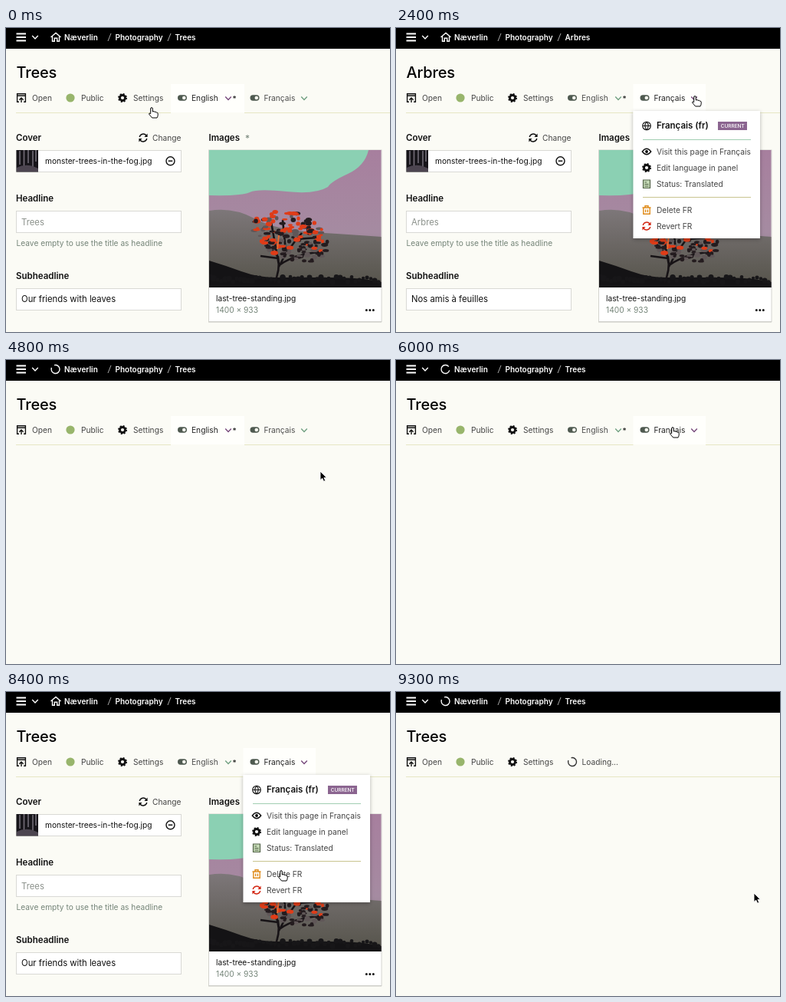
Animation of 501x396 px, one loop 9600 ms. Source, as an HTML page:

```html
<!DOCTYPE html>
<html lang="en">
<head>
<meta charset="utf-8">
<title>Language menu</title>
<style>
html, body { margin: 0; width: 100%; height: 100%; overflow: hidden; background: #fbfbf5; }
svg { display: block; width: 501px; height: 396px; font: 10.2px Inter, "Open Sans", sans-serif; }
text { fill: #444; white-space: pre; }
.crumb { font-size: 10px; font-weight: 600; fill: #fff; }
.title { font-size: 20px; font-weight: 500; fill: #000; letter-spacing: -.2px; }
.label { font-size: 11.5px; font-weight: 600; fill: #111; }
.value { font-size: 11.3px; fill: #111; }
.hint { fill: #748478; }
.ink { fill: #111; }
.red { fill: #d32814; }
.box { fill: #fff; stroke: #d9d9d5; }
.line { fill: none; stroke: currentColor; stroke-width: 1.4; }
</style>
</head>
<body>
<svg viewBox="0 0 501 396">
  <defs>
    <linearGradient id="dusk" x2="0" y2="1">
      <stop offset="0" stop-color="#a77f9e"/><stop offset=".6" stop-color="#a58ba1"/><stop offset="1" stop-color="#776f76"/>
    </linearGradient>
    <linearGradient id="hill" x2="0" y2="1">
      <stop offset="0" stop-color="#7d7779"/><stop offset="1" stop-color="#55534a"/>
    </linearGradient>
    <filter id="shade" x="-10%" y="-10%" width="120%" height="125%">
      <feDropShadow dx="0" dy="1.5" stdDeviation="2.5" flood-opacity=".3"/>
    </filter>
    <clipPath id="photo"><path d="M265 159H489.5V338H265z"/></clipPath>
    <path id="chev" class="line" d="M-3.8 -2L0 2L3.8 -2"/>
    <g id="gear">
      <circle r="3.5" fill="none" stroke="currentColor" stroke-width="2.8"/>
      <circle r="5" fill="none" stroke="currentColor" stroke-width="2" stroke-dasharray="2 1.927"/>
    </g>
    <g id="turn">
      <path class="line" d="M-4.8 -1A5 5 0 0 1 4 -3M4.8 1A5 5 0 0 1 -4 3"/>
      <path fill="currentColor" d="M5.6 -5.5V-1H1.4zM-5.6 5.5V1H-1.4z"/>
    </g>
    <g id="bin">
      <path class="line" stroke-width="1.2" d="M-5.5 -3H5.5M-2 -3V-5.2H2V-3M-4.2 -3V5.2H4.2V-3M-1.4 -.5V3M1.4 -.5V3"/>
    </g>
    <g id="toggle">
      <rect x="-6" y="-3.7" width="12" height="7.4" rx="3.7" fill="#4f5a50"/>
      <circle cx="2.3" r="2.3" fill="#f6f6ee"/>
    </g>
    <path id="ring" class="line" stroke-width="1.8" d="M-1.4 -5.3A5.5 5.5 0 1 1 -5.1 -2"/>
  </defs>

  <rect width="501" height="396" fill="#fbfbf5"/>
  <rect width="501" height="27"/>
  <path d="M13.5 7.5H26M13.5 12H26M13.5 16.5H26" stroke="#fff" stroke-width="1.8"/>
  <g color="#fff">
    <use href="#chev" x="38" y="12"/>
    <path id="home" class="line" d="M58.5 12L65 6.5L71.5 12M60.5 11V17.3H63.3V13.2H66.7V17.3H69.5V11"/>
    <use id="spin" href="#ring"/>
  </g>
  <text class="crumb" x="76" y="16">Næverlin</text>
  <text class="crumb" x="142.5" y="16">Photography</text>
  <text class="crumb" x="220.5" y="16" data-en="Trees" data-fr="Arbres"></text>
  <path d="M133 17L137 7M211 17L215 7" stroke="#aaa"/>

  <text class="title" x="13.5" y="64.5" data-en="Trees" data-fr="Arbres"></text>
  <rect id="tab" y="73" height="37" fill="#fffffc"/>
  <path id="rule" stroke="#e6e6c4"/>
  <path class="line" color="#111" d="M17 96.3H14.6V85.8H25.4V96.3H23M14.6 88.3H25.4M20 97V91.5M17.3 93.8L20 91.1L22.7 93.8"/>
  <text x="34" y="95">Open</text>
  <circle cx="84" cy="91" r="5.6" fill="#98b56c"/>
  <text x="98" y="95">Public</text>
  <use href="#gear" x="152" y="91" color="#111"/>
  <text x="166" y="95">Settings</text>
  <g id="langs">
    <use href="#toggle" x="230" y="91"/>
    <text id="enText" x="242" y="95">English</text>
    <use id="enChev" href="#chev" x="290" y="91.5"/>
    <text class="ink" x="295.5" y="95.5">*</text>
    <use href="#toggle" x="324.5" y="91"/>
    <text id="frText" x="336.5" y="95">Français</text>
    <use id="frChev" href="#chev" x="389" y="91.5"/>
  </g>
  <g id="wait">
    <use id="spinTab" href="#ring" color="#333"/>
    <text x="242.5" y="95">Loading...</text>
  </g>

  <g id="content">
    <text class="label" x="13" y="147">Cover</text>
    <use href="#turn" x="179" y="143" color="#111"/>
    <text x="191" y="146.5">Change</text>
    <rect class="box" x="13.5" y="159.5" width="215" height="28"/>
    <rect x="13.5" y="159" width="28.5" height="28.5" fill="#17151a"/>
    <path d="M18 160V178M23.5 159V182M29 159V176M35 160V181M39 159V174" stroke="#77717c" stroke-width="1.5"/>
    <path d="M14 182Q27 175 42 183V187H14z" fill="#4c4550"/>
    <text class="ink" x="51" y="177">monster-trees-in-the-fog.jpg</text>
    <path class="line" color="#111" d="M209 173.3a5.5 5.5 0 1 1 11 0a5.5 5.5 0 1 1 -11 0M211.7 173.3H217.3"/>

    <text class="label" x="13" y="226">Headline</text>
    <rect class="box" x="13.5" y="238.5" width="215" height="28"/>
    <text class="value" style="fill:#8b918b" x="20" y="257" data-en="Trees" data-fr="Arbres"></text>
    <text class="hint" x="13.5" y="283.5">Leave empty to use the title as headline</text>
    <text class="label" x="13" y="327">Subheadline</text>
    <rect class="box" x="13.5" y="339.5" width="215" height="28"/>
    <text class="value" x="20" y="357" data-en="Our friends with leaves" data-fr="Nos amis à feuilles"></text>

    <text class="label" x="264.5" y="147">Images</text>
    <text class="hint" x="312" y="148" font-size="12">*</text>
    <rect x="264.5" y="159" width="225.5" height="223.5" fill="#fff" stroke="#d4d4cf"/>
    <path d="M264 383H490" stroke="#c9c9c4"/>
    <g id="scene" clip-path="url(#photo)">
      <path d="M265 159H490V338H265z" fill="url(#dusk)"/>
      <path d="M265 159H473Q468 180 446 190T420 207Q404 217 366 213T318 214T265 218z" fill="#8bd0b3"/>
      <path d="M265 238Q296 233 324 248T400 266T490 272V338H265z" fill="url(#hill)"/>
      <path d="M265 303Q285 309 307 317T352 325T420 325T490 331V338H265z" fill="#141315"/>
    </g>
    <text class="ink" x="274" y="356">last-tree-standing.jpg</text>
    <text class="hint" x="274" y="371">1400 × 933</text>
    <path d="M470.3 367.5h.01M474.8 367.5h.01M479.3 367.5h.01" stroke="#111" stroke-width="3" stroke-linecap="round"/>
  </g>

  <g id="menu">
    <rect x="309.5" y="108" width="165.5" height="166" fill="#fff" filter="url(#shade)"/>
    <path class="line" color="#111" d="M321.7 127.5a5.3 5.3 0 1 1 10.6 0a5.3 5.3 0 1 1 -10.6 0H332.3M327 122.2Q322.5 127.5 327 132.8Q331.5 127.5 327 122.2" style="stroke-width:1.1"/>
    <text class="label" x="340" y="131.3">Français (fr)</text>
    <rect x="420" y="122" width="38" height="11" fill="#8b6590"/>
    <text x="423.7" y="130" style="font-size:6.5px;font-weight:500;fill:#fff">CURRENT</text>
    <path d="M322 145.5H463" stroke="#a2ceb2"/>
    <path d="M322 220.5H463" stroke="#c9c58f"/>
    <path class="line" color="#111" d="M321.3 161Q327 153.5 332.7 161Q327 168.5 321.3 161z"/>
    <circle cx="327" cy="161" r="1.9"/>
    <text x="340" y="165">Visit this page in Français</text>
    <use href="#gear" x="327" y="182" color="#111"/>
    <text x="340" y="186">Edit language in panel</text>
    <path d="M322.5 198H331.5V208.5H322.5z" fill="#c4d9b5" stroke="#536348" stroke-width="1.2"/>
    <path d="M324.5 201H327M324.5 203.5H329.5M324.5 206H329.5" stroke="#536348"/>
    <text x="340" y="207">Status: Translated</text>
    <use href="#bin" x="327" y="237" color="#df8a18"/>
    <text x="340" y="241">Delete FR</text>
    <use href="#turn" x="327" y="258" color="#d32814"/>
    <text x="340" y="262">Revert FR</text>
  </g>

  <rect id="dim" width="501" height="396" fill-opacity=".6"/>
  <g id="dialog"></g>

  <g id="cursor">
    <path id="arrow" d="M0 0V11.5L2.7 9.1L4.6 13.2L6.7 12.2L4.9 8.3H8.4z" fill="#000" stroke="#fff" stroke-width=".9"/>
    <path id="hand" d="M-1.3 6.6V1A1.3 1.3 0 0 1 1.3 1V5Q3.6 3.9 4 5.4Q6 4.6 6.4 6.2Q8.2 5.9 8.2 7.6V9.6Q8 11.4 7 13H.6Q-1.4 10.8 -3.3 8.2Q-3.6 6 -1.3 7.6z" fill="#fff" stroke="#000"/>
  </g>
</svg>
<script>
const STEP = 300, LOOP = 9600;
const $ = id => document.getElementById(id);
const show = (id, on) => { $(id).style.display = on ? '' : 'none'; };
const NS = 'http://www.w3.org/2000/svg';

// step: [view, active tab, overlay, cursor, x, y]
const steps = [
  ['en', 'en', '', 'hand', 190, 104],
  ['en', 'en', '', 'arrow', 278, 103],
  ['en', 'en', '', 'hand', 352, 89],
  ['load', 'fr', '', 'hand', 356, 88],
  ['fr', 'fr', '', 'hand', 372, 88],
  ['fr', 'fr', '', 'hand', 388, 88],
  ['fr', 'fr', '', 'hand', 388, 88],
  ['fr', 'fr', 'menu', 'hand', 389, 88],
  ['fr', 'fr', 'menu', 'hand', 390, 89],
  ['fr', 'fr', 'menu', 'hand', 380, 178],
  ['fr', 'fr', 'menu', 'hand', 366, 253],
  ['fr', 'fr', 'revert', 'arrow', 362, 256],
  ['fr', 'fr', 'revert', 'arrow', 347, 258],
  ['fr', 'fr', 'revert', 'arrow', 422, 263],
  ['fr', 'fr', 'revert', 'hand', 483, 266],
  ['load', 'en', '', 'arrow', 470, 246],
  ['load', 'en', '', 'arrow', 410, 145],
  ['en', 'en', '', 'arrow', 392, 112],
  ['en', 'en', '', 'hand', 362, 90],
  ['load', 'fr', '', 'hand', 360, 88],
  ['load', 'fr', '', 'hand', 361, 88],
  ['en', 'fr', '', 'hand', 372, 88],
  ['en', 'fr', '', 'hand', 385, 89],
  ['en', 'fr', 'menu', 'hand', 387, 88],
  ['en', 'fr', 'menu', 'arrow', 386, 116],
  ['en', 'fr', 'menu', 'hand', 377, 176],
  ['en', 'fr', 'menu', 'hand', 364, 229],
  ['en', 'fr', 'menu', 'hand', 360, 232],
  ['en', 'fr', 'menu', 'hand', 359, 233],
  ['en', 'fr', 'delete', 'arrow', 372, 243],
  ['en', 'fr', 'delete', 'hand', 466, 258],
  ['lang', '', '', 'arrow', 467, 262]
];

const dialogs = {
  revert: { icon: 'turn', lines: ['Do you really want to revert the content', 'to the current state of the default', 'language?'] },
  delete: { icon: 'bin', lines: ['Do you really want to delete the content', 'of this language?'] }
};

function dialogMarkup({ icon, lines }) {
  const height = 71 + 18 * lines.length, top = 224.5 - height / 2, foot = top + height - 17;
  const text = lines.map((s, i) =>
    `<text class="value" x="264" y="${top + 31 + 18 * i}">${s}</text>`).join('');
  return `<rect x="246" y="${top}" width="270" height="${height}" fill="#fff" filter="url(#shade)"/>${text}
    <path d="M246 ${foot - 18}H501" stroke="#e4e4e8"/>
    <g transform="translate(270 ${foot})" class="line" color="#111"><circle r="5.3"/><path d="M-2 -2L2 2M2 -2L-2 2"/></g>
    <text class="ink" x="285" y="${foot + 4}">Cancel</text>
    <use href="#${icon}" x="463" y="${foot}" color="#d32814"/>
    <text class="red" x="478" y="${foot + 4}">Ok</text>`;
}

function part(parent, name, attrs) {
  const el = document.createElementNS(NS, name);
  for (const key in attrs) el.setAttribute(key, attrs[key]);
  parent.append(el);
}

function growTree() {
  let seed = 19;
  const rnd = () => (seed = seed * 16807 % 2147483647) / 2147483647;
  const scene = $('scene');
  part(scene, 'path', {
    d: 'M350 332Q358 316 355 298L337 278M356 309L346 253M356 311Q366 290 386 267M358 308Q376 295 414 291M355 300L332 297M365 291L361 250M379 275L407 273',
    fill: 'none', stroke: '#171316', 'stroke-width': 2.6
  });
  for (let i = 0; i < 170; i++) {
    const angle = rnd() * 6.283, reach = Math.sqrt(rnd());
    const x = 372 + 49 * reach * Math.cos(angle);
    const y = 271 + 32 * reach * Math.sin(angle) + (x - 372) * .25;
    if (y > 304 || y < 234) continue;
    const red = rnd() < .62 - (y - 252) * .014;
    part(scene, 'ellipse', {
      cx: x.toFixed(1), cy: y.toFixed(1), rx: 2 + 3 * rnd(), ry: 1.3 + 1.8 * rnd(),
      fill: red ? '#df3c18' : rnd() < .6 ? '#241c1f' : '#605758'
    });
  }
  part(scene, 'path', { d: 'M356 270L354 288', stroke: '#e66a32', 'stroke-width': 2 });
  for (let x = 266; x < 490; x += 5)
    part(scene, 'circle', { cx: x, cy: 331 - 7 * rnd(), r: 2 + 2 * rnd(), fill: '#171618' });
}

function setTab(tab) {
  const on = { en: [215, 96], fr: [309.5, 94.5] }[tab];
  show('tab', on);
  $('rule').setAttribute('d', on ? `M13 110.5H${on[0]}M${on[0] + on[1]} 110.5H501` : 'M13 110.5H501');
  if (!on) return;
  $('tab').setAttribute('x', on[0]);
  $('tab').setAttribute('width', on[1]);
  for (const lang of ['en', 'fr']) {
    $(lang + 'Text').style.fill = lang === tab ? '#222' : '#4c4c4c';
    $(lang + 'Chev').style.color = lang === tab ? '#77497b' : '#71a082';
  }
}

function draw(n) {
  const [view, tab, over, kind, x, y] = steps[n];
  const busy = view === 'load' || view === 'lang';
  const lang = view === 'fr' ? 'fr' : 'en';
  document.querySelectorAll('[data-en]').forEach(el => { el.textContent = el.dataset[lang]; });
  setTab(tab);
  show('content', !busy);
  show('home', !busy);
  show('spin', busy);
  show('langs', view !== 'lang');
  show('wait', view === 'lang');
  show('menu', over === 'menu');
  const dialog = dialogs[over];
  show('dim', dialog);
  $('dialog').innerHTML = dialog ? dialogMarkup(dialog) : '';
  const turn = (n - 16) * 120;
  $('spin').setAttribute('transform', `translate(64.5 12) rotate(${turn})`);
  $('spinTab').setAttribute('transform', `translate(230 91) rotate(${turn})`);
  show('arrow', kind === 'arrow');
  show('hand', kind === 'hand');
  $('cursor').setAttribute('transform', `translate(${x} ${y})`);
}

growTree();
const start = performance.now();
let last = -1;
function tick() {
  const n = Math.floor((performance.now() - start) % LOOP / STEP);
  if (n !== last) draw(last = n);
  requestAnimationFrame(tick);
}
tick();
</script>
</body>
</html>
```
